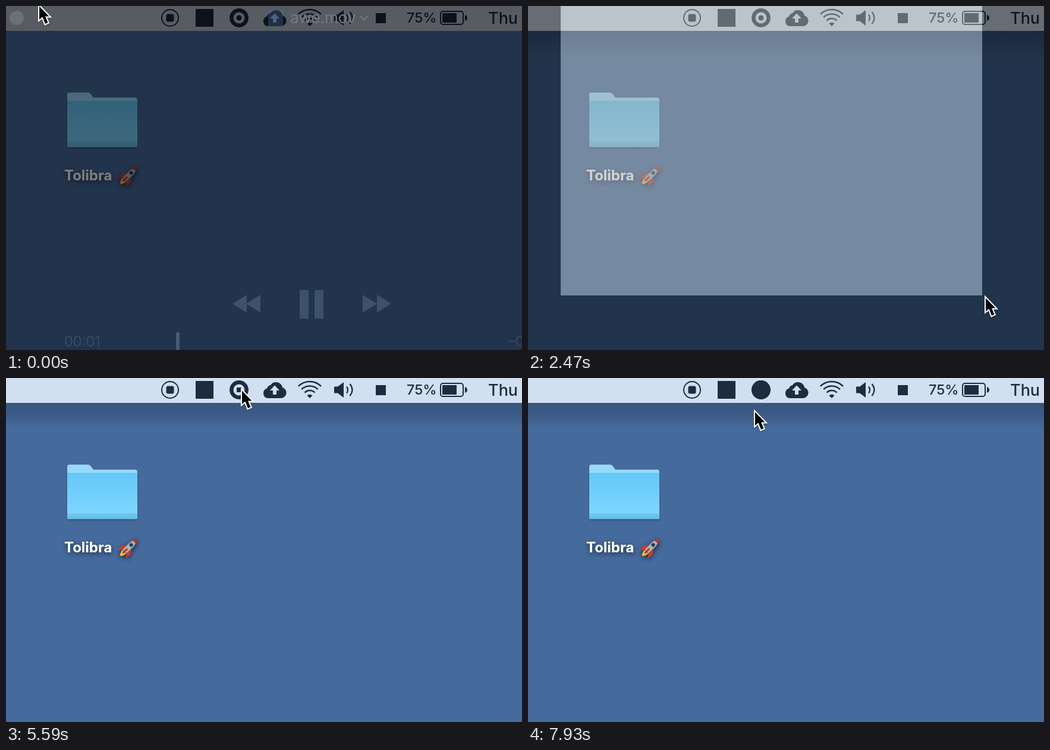
These frames come from a looping animation (868x580 px, 8000 ms). An HTML page:

```html
<!DOCTYPE html>
<html lang="en">
<head>
<meta charset="utf-8">
<title>Screen recording</title>
<style>
  html, body { margin: 0; width: 868px; height: 580px; overflow: hidden; background: #456a9c; }
  svg { display: block; font-family: Inter, Roboto, sans-serif; }
  .ink { fill: #1f2c40; }
  .line { fill: none; stroke: #1f2c40; }
  #menu text { font-size: 26.8px; font-weight: 500; fill: #00102c; }
</style>
</head>
<body>
<svg width="868" height="580" viewBox="0 0 868 580">
  <defs>
    <linearGradient id="under" x2="0" y2="1">
      <stop stop-opacity=".2"/>
      <stop offset=".5" stop-opacity=".12"/>
      <stop offset="1" stop-opacity="0"/>
    </linearGradient>
    <linearGradient id="front" x2="0" y2="1">
      <stop stop-color="#63c8f8"/>
      <stop offset=".85" stop-color="#7dd5fe"/>
      <stop offset="1" stop-color="#68bde6"/>
    </linearGradient>
    <filter id="soft" x="-30%" y="-40%" width="160%" height="200%">
      <feDropShadow dx="0" dy="3" stdDeviation="4" flood-opacity=".6"/>
    </filter>
    <filter id="faint" x="-30%" y="-30%" width="160%" height="180%">
      <feDropShadow dx="0" dy="1.500" stdDeviation="1" flood-opacity=".3"/>
    </filter>
    <filter id="wide" x="-20%" y="-20%" width="140%" height="150%">
      <feDropShadow dx="0" dy="8" stdDeviation="9" flood-opacity=".35"/>
    </filter>
  </defs>

  <rect width="868" height="580" fill="#456a9c"/>
  <rect id="shade" y="42" width="868" height="44" fill="url(#under)"/>

  <!-- folder -->
  <g filter="url(#faint)">
    <path d="M103 235V150q0-4 4-4h31q3 0 5 3l4 5.500h70q4 0 4 4V235q0 3-3 3H106q-3 0-3-3z" fill="#97d9fb"/>
    <path d="M103 160H221V235q0 3-3 3H106q-3 0-3-3z" fill="url(#front)"/>
    <path d="M104 229.500H220M104 232.500H220M104 235.500H220" stroke="#5db4df" stroke-width=".8"/>
  </g>
  <g filter="url(#soft)">
    <text x="98" y="294" font-size="24" font-weight="700" fill="#fff">Tolibra</text>
    <g transform="translate(207 285) rotate(45)">
      <path d="M-5 9Q-3 19 0 21Q3 19 5 9z" fill="#ffc928"/>
      <path d="M-5-1L-10 7V17L-4 10H4L10 17V7L5-1z" fill="#e0361f"/>
      <path d="M-5 11V-6Q-4-15 0-20Q4-15 5-6V11z" fill="#a9b3bd" stroke="#4a5560"/>
      <path d="M-4-12Q-2-17 0-20Q2-17 4-12z" fill="#c8321f"/>
      <circle cy="-5" r="3" fill="#24384f"/>
      <path d="M-1.500 4h3v11h-3z" fill="#c8321f"/>
    </g>
  </g>

  <!-- menu bar -->
  <rect width="868" height="42" fill="#d1dff0"/>
  <rect id="active" x="362" width="60" height="42" fill="#126fec"/>
  <circle class="line" cx="276" cy="20" r="14" stroke-width="2"/>
  <rect class="ink" x="269.500" y="13.500" width="13" height="13" rx="3"/>
  <rect class="ink" x="319" y="5" width="30" height="30"/>
  <g id="rec" transform="translate(392 20)" fill="#1f2c40" stroke="#1f2c40">
    <circle r="12.700" fill="none" stroke-width="6.400"/>
    <circle id="dot" r="4.500" stroke="none"/>
    <rect id="stop" x="-4" y="-4" width="8" height="8" stroke="none"/>
    <circle id="idle" r="15.900" stroke="none"/>
  </g>
  <path class="ink" d="M440 34a8.500 8.500 0 0 1-1-16.500A8 8 0 0 1 445 12A11 11 0 0 1 465 16A9.200 9.200 0 0 1 463 34z"/>
  <path d="M452 12.500l8 8.500h-5v7h-6v-7h-5z" fill="#d1dff0"/>
  <g id="wifi" class="line" stroke-width="2.500"></g>
  <path class="ink" d="M511 34l-4.500-4.500q4.500-3.500 9 0z"/>
  <path class="ink" d="M552 14.500h6l10-7.500V33l-10-7.500h-6z"/>
  <path class="line" stroke-width="2.200" d="M573 14.500q4 5.500 0 11M578.500 10q8 10 0 20"/>
  <rect class="ink" x="622" y="12" width="17" height="17"/>
  <text class="ink" x="674" y="28" font-size="23.500" font-weight="500">75%</text>
  <rect class="line" x="731" y="9" width="38" height="22" rx="4" stroke-width="2"/>
  <path class="ink" d="M734 12h24v16h-24zM772 15q4 1 4 5t-4 5z"/>
  <text class="ink" x="811" y="30" font-size="27" font-weight="500">Thu</text>

  <!-- area selection -->
  <path id="dim" fill-rule="evenodd" opacity=".51"/>
  <rect id="area" x="55" fill="#a6a8a8" opacity=".5"/>

  <!-- player window -->
  <g id="window">
    <rect width="868" height="42" opacity=".16"/>
    <circle cx="18" cy="20" r="12" fill="#6c7273"/>
  </g>
  <g id="player" fill="#3d506c">
    <rect x="441" y="7" width="25" height="27" fill="#4b73ac" opacity=".3"/>
    <text x="478" y="29" font-size="26" fill="#747a83">awe.mov</text>
    <path d="M596 17l6 6 6-6" fill="none" stroke="#747a83" stroke-width="2"/>
    <path d="M381 502L405 487V517zM404 502L428 487V517zM600 487L624 502L600 517zM624 487L648 502L624 517z"/>
    <path d="M494 479h15v48h-15zM519 479h15v48h-15z"/>
    <rect x="286" y="550" width="6" height="34" rx="2" fill="#465a75"/>
    <text x="98" y="574" font-size="24" font-weight="300">00:01</text>
    <text x="845" y="574" font-size="24" font-weight="300">–00:05</text>
  </g>

  <!-- drop-down -->
  <g id="menu">
    <path d="M362 42H642V276q0 10-10 10H372q-10 0-10-10z" fill="#cbd7ee" filter="url(#wide)"/>
    <rect x="362" y="50" width="280" height="38" fill="#0f67e4"/>
    <path d="M362 100H642M362 165H642M376 228H642" stroke="#b4c3df" stroke-width="3"/>
    <text x="404" y="78" style="fill:#fff">Stop Recording</text>
    <circle cx="422" cy="131" r="16" fill="#1da1f2"/>
    <text x="450" y="141">Fribbel</text>
    <text x="404" y="206">Help</text>
    <text x="404" y="267">Quit</text>
  </g>

  <path id="cursor" filter="url(#faint)" d="M2 4.500V27L7.500 22.500L12 34L16.500 32L12 21.500H18.500z" stroke="#fff" stroke-width="4" paint-order="stroke"/>
</svg>
<script>
const LOOP = 8000, STEP = 130;
const $ = id => document.getElementById(id);
const show = (id, alpha) => $(id).setAttribute('opacity', +alpha);
const clamp = v => Math.max(0, Math.min(1, v));

// pointer path: time, x, y
const path = [
  [0, 54, -4], [650, 54, -4], [1170, 370, 205], [1560, 640, 384],
  [1820, 673, 408], [2470, 768, 488], [3250, 801, 506], [3640, 801, 506],
  [3900, 805, 465], [4290, 818, 245], [4700, 700, 70], [5200, 430, 12],
  [5460, 395, 17], [5980, 395, 17], [6500, 411, 53], [7280, 411, 53],
  [7800, 380, 53], [8000, 380, 53]
];

$('wifi').innerHTML = [27, 19.5, 12].map(r => {
  const d = r * Math.SQRT1_2;
  return `<path d="M${511 - d} ${33 - d}A${r} ${r} 0 0 1 ${511 + d} ${33 - d}"/>`;
}).join('');

function pointer(t) {
  const i = path.findIndex(k => k[0] > t);
  const [t0, x0, y0] = path[i - 1], [t1, x1, y1] = path[i];
  const p = (t - t0) / (t1 - t0);
  return [x0 + (x1 - x0) * p, y0 + (y1 - y0) * p];
}

function draw(t) {
  const [x, y] = pointer(t);
  $('cursor').setAttribute('transform', `translate(${x} ${y})`);

  const selecting = t >= 780 && t < 3510;
  const w = selecting ? Math.max(0, x - 59) : 0, h = Math.max(0, y);
  $('area').setAttribute('width', w);
  $('area').setAttribute('height', h);
  $('dim').setAttribute('d', t < 3510 ? `M0 0H868V580H0zM55 0h${w}v${h}h${-w}z` : '');

  show('window', t < 780);
  show('player', clamp(1 - t / 520));
  show('shade', t >= 780);

  const open = t >= 5850 && t < 7410;
  show('active', open);
  show('menu', open ? (t < 7150 ? 1 : t < 7280 ? .7 : .34) : 0);

  const color = open ? '#fff' : '#1f2c40';
  $('rec').setAttribute('fill', color);
  $('rec').setAttribute('stroke', color);
  show('dot', t < 3510);
  show('stop', t >= 3510 && t < 7410);
  show('idle', t >= 7410);
}

function tick() {
  const t = performance.now() % LOOP;
  draw(Math.floor(t / STEP) * STEP);
  requestAnimationFrame(tick);
}
tick();
</script>
</body>
</html>
```
